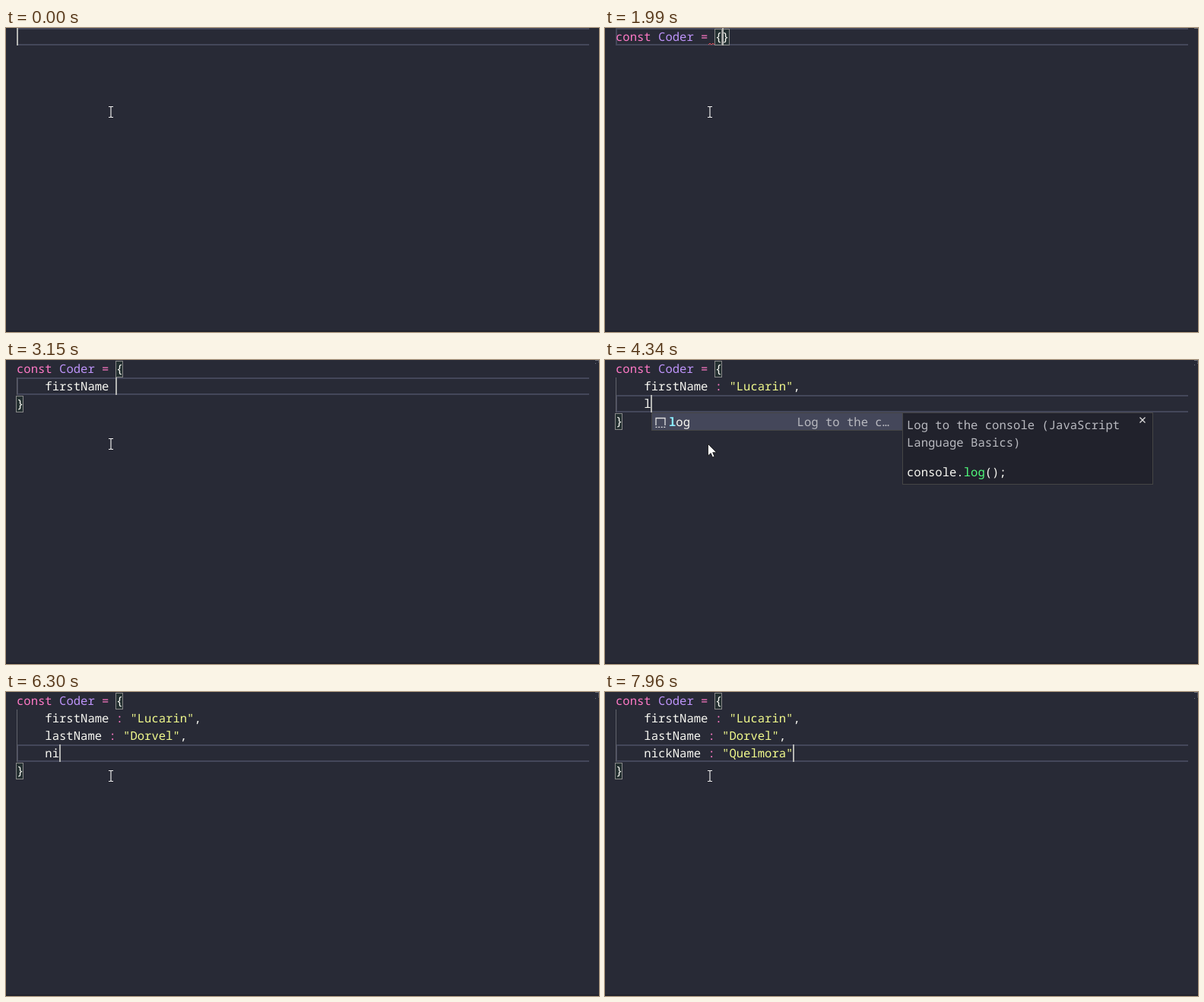
An HTML page that plays this animation: 780x400 px, repeating every 8000 ms.

```html
<!DOCTYPE html>
<html lang="en">
<head>
<meta charset="utf-8">
<title>Typing an object literal</title>
<style>
html, body { margin: 0; width: 100%; height: 100%; overflow: hidden; background: #282a36; }
#stage {
  position: absolute; left: 0; top: 0; width: 780px; height: 400px; overflow: hidden;
  font: 15.577px/23px "Noto Sans Mono", "DejaVu Sans Mono", monospace;
  color: #f8f8f2; white-space: pre; text-rendering: geometricPrecision;
  font-variant-ligatures: none;
}
#stage div, #stage svg { position: absolute; box-sizing: border-box; }
#stage .foot { left: 0; top: 398px; width: 780px; height: 2px; background: #22232d; }
.line { left: 14px; width: 753px; height: 23px; border: 2px solid #44475a; border-right: 0; }
.guide { left: 14px; top: 23px; width: 1px; background: #62646c; }
.match { width: 10px; height: 22px; border: 1px solid #888; background: rgba(0, 100, 0, .1); }
.caret { width: 2px; height: 23px; background: #b4b5b3; }
.map { height: 1px; background: #70727c; }
.list, .doc { background: #21222c; border: 1px solid #454545; overflow: hidden; }
.row { left: 0; width: 100%; height: 23px; }
.row.hover { background: #343746; }
.row.on { background: #44475a; }
.row .name { left: 22px; }
.row .info { color: #b9bac0; }
.row b { color: #8be9fd; }
.doc .about { color: #b9bac0; left: 5px; top: 4px; }
.doc .code { left: 5px; top: 66px; }
.doc svg { left: 310px; top: 4px; }
.kw { color: #ff79c6; } .id { color: #bd93f9; } .str { color: #f1fa8c; } .fn { color: #50fa7b; }
</style>
</head>
<body>
<div id="stage"></div>
<script>
const LOOP = 8000, X0 = 14, CW = 9.346, LH = 23;
const MOUSE = { x: 137, y: 111 };

// Typing runs: start, ms per key, keys
const runs = [
  [70, 140, 'co'], [430, 80, 'ns'], [670, 130, 't Co'], [1140, 75, 'der'],
  [1440, 156, ' = {'], [2060, 80, '\nf'], [2290, 0, 'i'], [2530, 76, 'rstName'],
  [3150, 80, ' : '], [3390, 82, '"Lucarin",'], [4210, 70, '\nl'], [4420, 62, 'astName '],
  [4960, 80, ': "'], [5200, 96, 'Dorvel"'], [5860, 85, ',\nn'], [6220, 0, 'i'],
  [6380, 80, 'ck'], [6610, 86, 'Name : "Qu'], [7470, 81, 'elmora"']
];
const keys = runs.flatMap(([start, step, text]) =>
  [...text].map((ch, i) => ({ t: start + i * step, ch })));

// Suggestion queries: time, query (empty closes the popup)
const queries = [
  [0, ''], [140, 'c'], [210, 'co'], [430, 'con'], [510, 'cons'], [670, 'const'], [800, ''],
  [2210, 'f'], [2290, 'fi'], [2530, 'fir'], [2606, ''],
  [4340, 'l'], [4420, ''], [6090, 'n'], [6220, '']
];

const globals = ['console', 'const', 'ConstantSourceNode', 'msContentScript',
  'CountQueuingStrategy', 'HTMLFormControlsCollection', 'CompositionEvent', 'CloseEvent',
  'DynamicsCompressorNode', 'CaretPosition', 'customElements', 'CustomElementRegistry'];

const snippets = {
  f: { name: 'filter', about: 'Filter an array (JavaScript\nLanguage Basics)',
    code: 'list.<span class="fn">filter</span>(\n  function (item) {\n    return item;\n  }\n);\n' },
  l: { name: 'log', about: 'Log to the console (JavaScript\nLanguage Basics)',
    code: 'console.<span class="fn">log</span>();' },
  n: { name: 'new', about: 'New object (JavaScript\nLanguage Basics)',
    code: '<span class="kw">new</span> Object();' }
};

const svg = (w, h, body, pos = '') =>
  `<svg width="${w}" height="${h}" style="${pos}" fill="none">${body}</svg>`;
const icon = body => svg(22, 23, body, 'left:0;top:0');
const icons = {
  variable: icon(`<g stroke="#75beff" stroke-width="1.3"><path d="M6.5 7H4v9.500h2.500M15.500 7H18v9.500h-2.500"/>
    <path d="M7.500 11.500l4-2.500 3.200 1.700v2l-4 2.300-3.200-1.700zM7.500 11.500l3.200 1.400 4-2.200"/></g>`),
  keyword: icon(`<g stroke="#d4d4d4" stroke-width="1.500"><path d="M3 7h7M12 7h5M3 10.500h3M8 10.500h7M3 14h9M14 14h3M3 17.300h6M11 17.300h6"/></g>`),
  snippet: icon(`<g stroke="#e0e0e0" stroke-width="1.300"><path d="M5 16V6.500h12V16"/>
    <path d="M4.500 18.300h13" stroke-dasharray="2 1.600"/></g>`)
};

const pointers = {
  beam: svg(12, 20, `<path d="M3 3.500h2.200l.8.800.8-.8H9M6 4v13M3 17.500h2.200l.8-.8.8.8H9" stroke="#181920" stroke-width="2" opacity=".5"/>
    <path d="M3 3.500h2.200l.8.800.8-.8H9M6 4v13M3 17.500h2.200l.8-.8.8.8H9" stroke="#fff" stroke-width="1.100"/>`, 'left:131.500px;top:100px'),
  arrow: svg(14, 22, `<path d="M1.500 1.500v15.500l3.700-3.400 2.300 5.400 2.500-1-2.300-5.300h5z" fill="#fff" stroke="#111" stroke-width=".8"/>`, 'left:134px;top:108.500px'),
  hand: svg(18, 25, `<path d="M5.500 3q0-1.500 1.500-1.500T8.500 3v6.500q2.200-1.200 2.700.6 2-.8 2.500.9 2.300-.6 2.300 1.500v4q0 2.500-1.500 4V23h-8v-2.500L2 15.500q-1.200-2 .2-2.600 1.300-.6 3.300 2z" fill="#fff" stroke="#111" stroke-width=".9"/>`, 'left:130px;top:108px')
};

const box = (cls, x, y, style = '', body = '') =>
  `<div class="${cls}" style="left:${x}px;top:${y}px;${style}">${body}</div>`;
const colX = col => X0 + col * CW;

// Positions of the query's letters in order, or null
function letters(name, query) {
  const low = name.toLowerCase();
  const caps = name.indexOf(query[0].toUpperCase());
  let at = caps < 0 ? low.indexOf(query[0]) : caps;
  const found = [at];
  for (const ch of query.slice(1)) {
    at = low.indexOf(ch, at + 1);
    if (at < 0) return null;
    found.push(at);
  }
  return found;
}

function fuzzy(name, query) {
  const n = query.length;
  return letters(name, query) ||
    (n > 3 ? letters(name, query.slice(0, n - 2) + query[n - 1] + query[n - 2]) : null);
}

function marked(name, query) {
  const hits = fuzzy(name, query);
  return [...name].map((ch, i) => hits.includes(i) ? `<b>${ch}</b>` : ch).join('');
}

function row(i, cls, kind, name, info = '') {
  return `<div class="row ${cls}" style="top:${i * LH}px">${icons[kind]}<div class="name">${name}</div>${info}</div>`;
}

function globalPopup(query, x, y) {
  const names = globals.filter(name => fuzzy(name, query));
  const rows = names.map((name, i) => {
    const top = y + 1 + i * LH, isConst = name === 'const';
    const hover = MOUSE.y >= top && MOUSE.y < top + LH;
    return row(i, isConst ? 'on' : hover ? 'hover' : '', isConst ? 'keyword' : 'variable',
      marked(name, query), isConst ? '<div class="info" style="right:10px">const</div>' : '');
  });
  return box('list', x, y, `width:430px;height:${names.length * LH}px`, rows.join(''));
}

function snippetPopup(query, x, y) {
  const { name, about, code } = snippets[query[0]];
  const info = `<div class="info" style="right:17px">${about.slice(0, 12)}…</div>`;
  const height = 95 + (code.split('\n').length - 1) * LH;
  const close = svg(12, 12, '<path d="M1.500 1.500l7 7M8.500 1.500l-7 7" stroke="#ddd" stroke-width="1.300"/>');
  return box('list', x, y, 'width:331px;height:24px', row(0, 'on', 'snippet', marked(name, query), info)) +
    box('doc', x + 330, y, `width:330px;height:${height}px`,
      `<div class="about">${about}</div><div class="code">${code}</div>${close}`);
}

function paint(text) {
  return text.replace(/(const\b)|(?<=const )(\w+)|([=:])|("[^"]*"?)/g, (all, kw, id, op) =>
    `<span class="${kw || op ? 'kw' : id ? 'id' : 'str'}">${all}</span>`);
}

function scene(typed, query) {
  const lines = typed.split('\n').map((s, i) => i ? '    ' + s : s);
  const last = lines.length - 1;
  const col = lines[last].length, cx = colX(col);
  const open = typed.indexOf('{');
  let out = box('line', X0, last * LH);

  if (lines[last].split('"').length % 2 === 0) lines[last] += '"';
  if (open >= 0) {
    if (last) {
      lines.push('}');
      out += `<div class="guide" style="height:${last * LH}px"></div>`;
    } else lines[0] += '}';
    out += box('match', Math.floor(colX(open)), 1);
    out += last ? box('match', X0 - 1, (last + 1) * LH + 1) : box('match', Math.floor(cx), 1);
  }
  lines.forEach((s, i) => {
    out += box('', X0, i * LH, '', paint(s));
    const indent = i && s !== '}' ? 4 : 0;
    if (s.trim()) out += box('map', 775 + indent, i * 2, `width:${s === '}' ? 1 : 5 - indent}px`);
  });
  if (!last && typed.includes('= ')) {
    out += svg(10, 4, '<path d="M0 3l2-2 2 2 2-2 2 2" stroke="#e04a50"/>', 'left:136px;top:19px');
  }
  out += box('caret', Math.floor(cx), last * LH);

  let pointer = 'beam';
  if (query) {
    const x = Math.round(cx), y = (last + 1) * LH;
    const isGlobal = query[0] === 'c';
    out += (isGlobal ? globalPopup : snippetPopup)(query, x, y);
    const bottom = y + (isGlobal ? 276 : 24);
    pointer = MOUSE.y >= y && MOUSE.y < bottom && MOUSE.x >= x ? 'hand' : 'arrow';
  }
  return out + '<div class="foot"></div>' + pointers[pointer];
}

const stage = document.getElementById('stage');
const began = performance.now();
let shown = null;

function frame() {
  const t = Math.max(0, performance.now() - began) % LOOP;
  const typed = keys.filter(k => k.t <= t).map(k => k.ch).join('');
  const query = queries.filter(q => q[0] <= t).pop()[1];
  const state = typed + '|' + query;
  if (state !== shown) {
    stage.innerHTML = scene(typed, query);
    shown = state;
  }
  requestAnimationFrame(frame);
}
frame();
</script>
</body>
</html>
```
